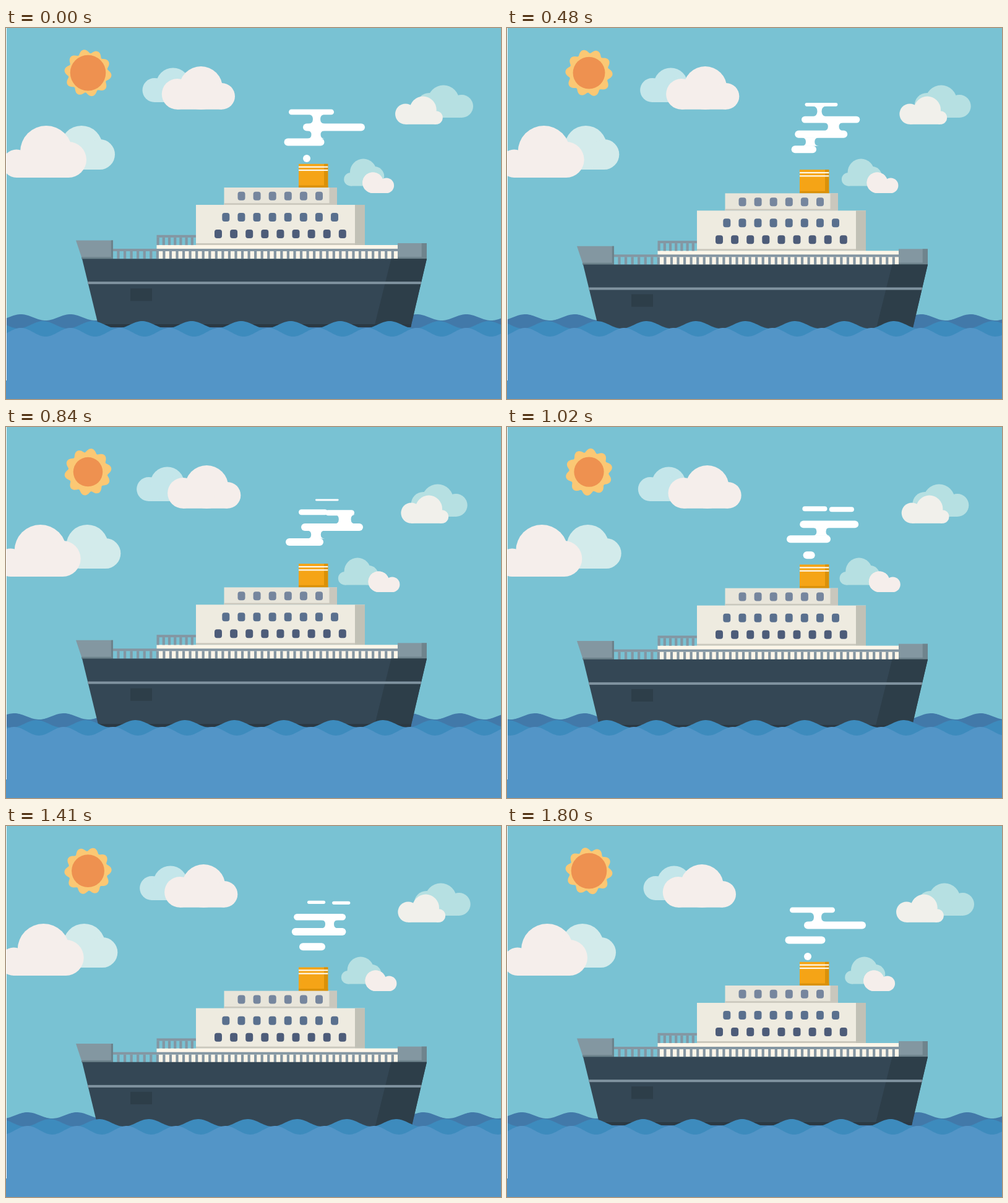
An HTML page with a canvas that plays this animation: 800x600 px, repeating every 1.83 s.

```html
<!DOCTYPE html>
<html lang="en">
<head>
<meta charset="utf-8">
<title>Ship at sea</title>
<style>
html, body { margin: 0; width: 100%; height: 100%; overflow: hidden; }
canvas { display: block; }
</style>
</head>
<body>
<canvas id="stage" width="800" height="600"></canvas>
<script>
const ctx = document.getElementById('stage').getContext('2d');
const LOOP = 1830, STEP = 30, CYCLE = 1800, HALF = CYCLE / 2;

// 0 to 1 and back in one period
const swing = (t, period) => 1 - Math.abs(1 - 2 * (t % period) / period);

// Interpolates keys of [time, ...values]; null outside their range.
function at(keys, x) {
  const i = keys.findIndex(k => k[0] >= x);
  if (i < 0 || x < keys[0][0]) return null;
  const a = keys[Math.max(i - 1, 0)], b = keys[i];
  const k = i ? (x - a[0]) / (b[0] - a[0]) : 0;
  return a.slice(1).map((v, j) => v + (b[j + 1] - v) * k);
}

function box(color, x0, y0, x1, y1) {
  ctx.fillStyle = color;
  ctx.fillRect(x0, y0, x1 - x0, y1 - y0);
}

function shape(color, ...points) {
  ctx.fillStyle = color;
  ctx.beginPath();
  points.forEach(p => ctx.lineTo(...p));
  ctx.fill();
}

function round(x, y, w, h, r) {
  ctx.beginPath();
  ctx.roundRect(x, y, w, h, r);
  ctx.fill();
}

function disc(x, y, r) {
  ctx.beginPath();
  ctx.arc(x, y, r, 0, 7);
  ctx.fill();
}

// Two side circles stand on the base, with a big one between them
function cloud(color, dx, base, [xl, rl], [x, y, r], [xr, rr]) {
  box(color, xl + dx, base - Math.min(rl, rr), xr + dx, base);
  disc(xl + dx, base - rl, rl);
  disc(x + dx, y, r);
  disc(xr + dx, base - rr, rr);
}

function clouds(d) {
  const white = '#f5eeeb';
  cloud('#c4e6ea', -d, 120, [240, 19.5], [270, 92, 27.5], [277, 20]);
  cloud(white, d, 131.7, [276.6, 24.8], [315, 97, 35], [348.7, 21.3]);
  cloud('#d3ebeb', -(-d), 229, [110, 24], [122, 192, 34], [151.5, 24.5]);
  cloud(white, -d, 242, [17, 22.8], [65, 200, 42], [101, 29]);
  cloud('#b6e0e2', -d, 145, [684, 20], [707, 118, 25.5], [736.5, 18.5]);
  cloud('#f1f0eb', d, 155.8, [645.7, 16.7], [674, 132.3, 21.7], [695, 10.8]);
  cloud('#b6e0e2', -d, 255.5, [557, 10.8], [577.5, 233.2, 21.6], [595.5, 15.7]);
  cloud(white, d, 267, [593, 16.8], [593, 250.2, 16.8], [614.8, 12.3]);
}

function sun(k) {
  const turn = (-11 + 60 * k) * Math.PI / 180, rim = [];
  for (let i = 0; i < 240; i++) {
    const a = i * Math.PI / 120, r = 35 + 3.1 * Math.cos(10 * a);
    const b = a + turn + 0.03 * Math.sin(10 * a);
    rim.push([132.5 + r * Math.sin(b), 72.7 - r * Math.cos(b)]);
  }
  shape('#fbc874', ...rim);
  ctx.fillStyle = '#ee9150';
  disc(132.5, 72.6, 28.8 - 5.4 * k);
}

function wave(color, crest, mid, amp, t) {
  const edge = [[800, 600], [0, 600]];
  for (let x = 0; x <= 800; x += 2)
    edge.push([x, mid - amp * Math.cos((x - crest - t * 160 / HALF) * Math.PI / 40)]);
  shape(color, ...edge);
}

function windows(color, x, y, count) {
  ctx.fillStyle = color;
  for (let i = 0; i < count; i++) round(x - 6 + 25.1 * i, y, 12, 14, 4);
}

function railing(x0, x1, y, post, gap) {
  const color = '#8496a2';
  box(color, x0, y, x1, y + 4);
  for (let x = post; x < x1 - 4; x += gap) box(color, x, y + 4, x + 4.2, y + 16.3);
}

// A block with a shaded right side and lower edge
function block(fill, side, foot, x0, y0, x1, y1, sideWidth, footHeight) {
  box(fill, x0, y0, x1, y1);
  box(foot, x0, y1 - footHeight, x1, y1);
  box(side, x1 - sideWidth, y0, x1, y1);
}

function ship(dy) {
  ctx.save();
  ctx.translate(0, dy);

  block('#f5a416', '#da9109', '#da9109', 473, 219.8, 520.3, 258, 6.3, 3.5);
  box('#fff8ea', 473, 223.6, 520.3, 225.8);
  box('#fff8ea', 473, 228.9, 520.3, 231.1);

  block('#e8e5da', '#c9c7bd', '#cbc8bd', 352.5, 258, 535, 286, 12.5, 2.7);
  block('#eeebe0', '#c1c1b6', '#cbc8bd', 307, 286, 580, 351, 16, 3);
  windows('#76869e', 380.5, 264.8, 6);
  windows('#5a708e', 355.3, 299, 8);
  windows('#4d5c79', 343, 326, 9);

  box('#fdf6e9', 243.5, 351, 633, 373.5);
  railing(173, 633, 357, 179.4, 10.555);
  railing(243.5, 307, 334.8, 243.5, 9.2);

  shape('#8397a1', [113, 343.4], [173, 343.4], [173, 373.5], [123, 373.5]);
  box('#6c828b', 122, 370.4, 173, 373.5);
  box('#6c828b', 169.8, 343.4, 173, 373.5);
  block('#8397a1', '#6f848d', '#6f848d', 633, 348, 680, 373.5, 8.3, 3.3);

  shape('#344755', [123, 373.2], [680, 373.2], [654, 484], [150, 484]);
  shape('#2d3e49', [622.5, 373.2], [680, 373.2], [654, 484], [595, 484]);
  shape('#2b3943', [149, 479], [655.2, 479], [654, 484], [150, 484]);
  box('#8093a0', 132.3, 410.2, 670.8, 414.2);
  box('#2d3e49', 201, 421.2, 236, 441.4);
  ctx.restore();
}

// Smoke by age of the puff: height, then centre and width
const RISE = [[0, 211], [600, 192.5], [1800, 160.5], [2400, 145], [3000, 126.8], [3600, 117]];
const FIRST = [[0, 486, 12], [660, 477.5, 51], [1200, 492.5, 81], [1800, 530, 100], [2640, 518, 90], [3580, 524, 56]];
const SECOND = [[0, 486, 12], [510, 495, 42], [900, 482, 65], [1740, 527, 100], [2700, 493.5, 73], [3580, 520, 36]];
// Necks above and below the first puff: centre and width
const ABOVE = [[150, 483, 11], [660, 494, 16], [1410, 523, 14], [1800, 502, 12], [2100, 502, 12], [2460, 508, 2]];
const BELOW = [[1800, 501, 15], [2700, 551, 20]];

const height = age => at(RISE, age)[0];
const thickness = age => 12 * (1 - (Math.max(0, age - 1800) / 2100) ** 1.5);

function puff(keys, age, splitAge = Infinity) {
  const span = at(keys, age);
  if (!span) return;
  const [x, w] = span, h = thickness(age), y = height(age) - h / 2;
  if (age < splitAge) return round(x - w / 2, y, w, h, h / 2);
  const gap = Math.min(11, (age - splitAge) / 25 - 5), half = (w - gap) / 2;
  round(x - w / 2, y, half, h, h / 2);
  round(x + gap / 2, y + 1, half, h, h / 2);
}

function neck(keys, age, upper, lower) {
  const span = at(keys, age);
  if (!span) return;
  const [x, w] = span;
  const top = height(upper) + thickness(upper) / 2 - 0.5;
  const base = height(lower) - thickness(lower) / 2 + 0.5;
  const mid = (top + base) / 2, r = (base - top) / 2;
  ctx.beginPath();
  for (const side of [-1, 1]) {
    const inner = x + side * w / 2, outer = inner + side * r;
    const [from, to] = side < 0 ? [top, base] : [base, top];
    ctx.lineTo(outer, from);
    ctx.quadraticCurveTo(inner, from, inner, mid);
    ctx.quadraticCurveTo(inner, to, outer, to);
  }
  ctx.fill();
}

function smoke(t) {
  ctx.fillStyle = '#fff';
  for (const age of [t - CYCLE, t, t + CYCLE]) {
    puff(FIRST, age, 2610);
    puff(SECOND, age + HALF);
    neck(ABOVE, age, age + HALF, age);
  }
  neck(BELOW, t + CYCLE, t + CYCLE, t + HALF);
}

function draw(now) {
  const t = Math.floor(now % LOOP / STEP) * STEP;
  const slow = swing(t, CYCLE);
  box('#79c2d3', 0, 0, 800, 600);
  sun(slow);
  clouds(10 * slow);
  smoke(t);
  wave('#4279a9', 24, 468, 5, t);
  ship(10 * swing(t, HALF));
  wave('#3d8bbd', 60, 480, 6, t);
  wave('#5395c7', 24, 492, 7, t);
  box('#fff', 0, 0, 1, 570);
  requestAnimationFrame(draw);
}
requestAnimationFrame(draw);
</script>
</body>
</html>
```
